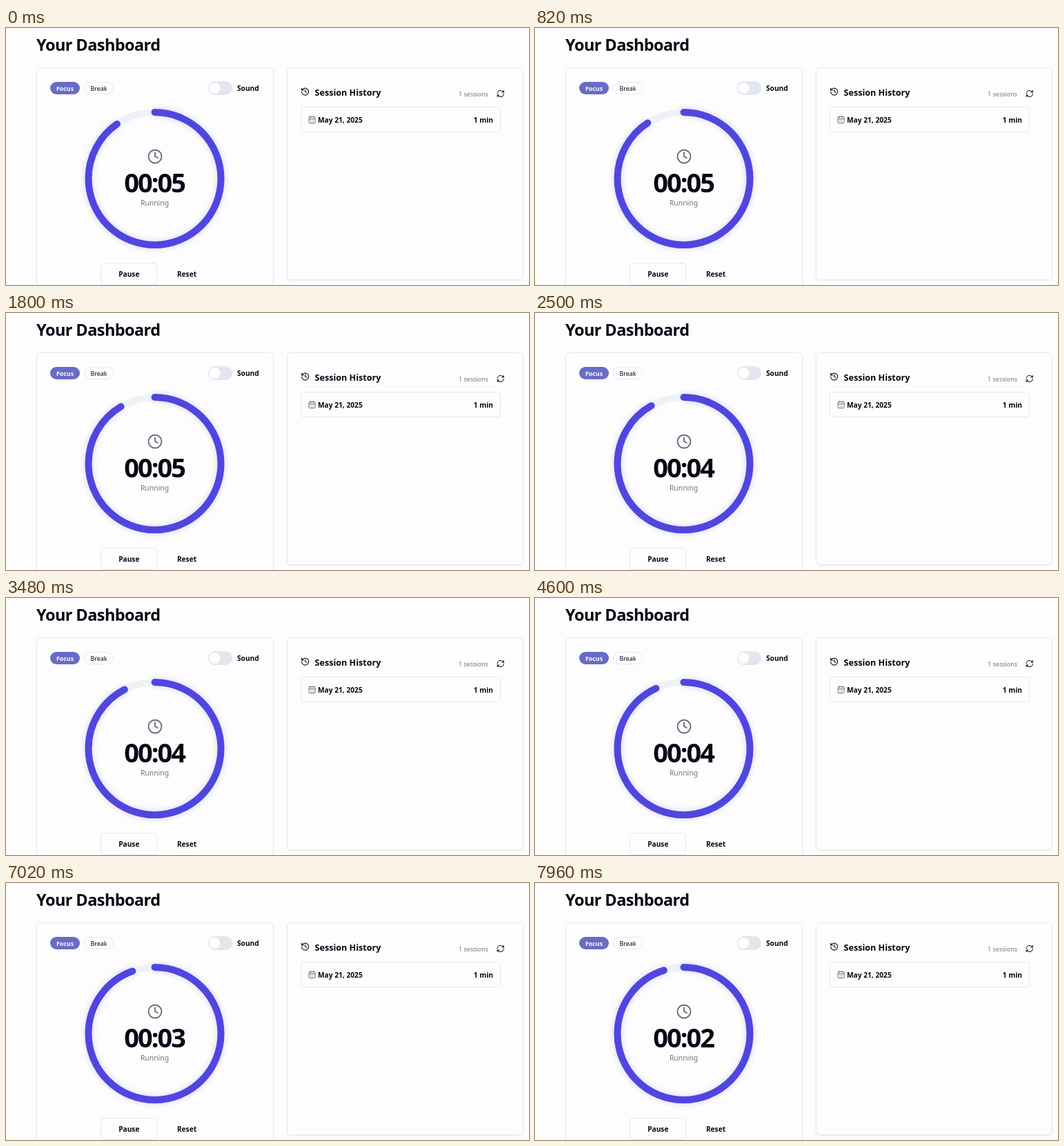
An HTML page that plays this animation: 758 px wide and 372 px high, repeating every 8 s.

```html
<!DOCTYPE html>
<html lang="en">
<head>
<meta charset="utf-8">
<title>Dashboard timer</title>
<style>
  html, body { margin: 0; width: 100%; height: 100%; overflow: hidden; background: #fdfdfd; }
  svg { display: block; width: 758px; height: 372px; }
  text { font: 600 10.2px "Noto Sans", "Open Sans", sans-serif; fill: #050814; }
  .title { font-size: 23.5px; font-weight: 700; letter-spacing: -.58px; }
  .time { font-size: 38px; font-weight: 700; letter-spacing: -2px; }
  .head { font-size: 12.6px; }
  .pill { font-size: 8.9px; }
  .mute { font-size: 10.4px; font-weight: 400; fill: #6b7585; }
  .box { fill: #fdfdfd; stroke: #e4e7f0; }
  .card { filter: drop-shadow(0 1px 1px rgba(0, 0, 0, .06)); }
  .icon { fill: none; stroke: #10131c; stroke-width: 2; stroke-linecap: round; stroke-linejoin: round; }
  .gray { stroke: #68707e; }
  .ring { fill: none; stroke-width: 10; }
</style>
</head>
<body>
<svg viewBox="0 0 758 372">
  <defs>
    <filter id="blur" x="-20%" y="-20%" width="140%" height="140%">
      <feGaussianBlur stdDeviation="5"/>
    </filter>
  </defs>

  <text class="title" x="44" y="33">Your Dashboard</text>

  <!-- timer card -->
  <rect class="box card" x="44.5" y="57.5" width="343" height="340" rx="5"/>
  <rect x="64" y="78" width="43" height="18" rx="9" fill="#686cc6"/>
  <text class="pill" x="85.5" y="91" text-anchor="middle" style="fill:#fdfdfd">Focus</text>
  <rect class="box" x="113.5" y="78.5" width="42" height="17" rx="8.5"/>
  <text class="pill" x="134.5" y="91" text-anchor="middle" style="font-weight:500">Break</text>
  <rect x="293" y="77" width="35" height="20" rx="10" fill="#e2e6ee"/>
  <circle cx="302.5" cy="87" r="8" fill="#fefefe"/>
  <text x="335" y="91">Sound</text>

  <g transform="translate(215.5 218) rotate(-90)">
    <circle class="ring arc" r="96" pathLength="360" stroke="#4f46c0" stroke-linecap="round" opacity=".24" filter="url(#blur)"/>
    <circle class="ring" r="96" stroke="#eff1f7"/>
    <circle class="ring arc" r="96" pathLength="360" stroke="#4f46e0" stroke-linecap="round"/>
  </g>

  <g class="icon gray" transform="translate(204.6 174.6) scale(.95)">
    <circle cx="12" cy="12" r="10"/>
    <path d="M12 6v6l4 2"/>
  </g>
  <text class="time" id="time" x="171.2" y="238">00:05</text>
  <text class="mute" x="215.5" y="257" text-anchor="middle">Running</text>

  <rect class="box" x="137.5" y="340.5" width="81" height="31" rx="4"/>
  <text x="178.3" y="360" text-anchor="middle">Pause</text>
  <text x="262" y="360" text-anchor="middle">Reset</text>

  <!-- history card -->
  <rect class="box card" x="407.5" y="57.5" width="342" height="307" rx="5"/>
  <g class="icon" transform="translate(426.9 85.4) scale(.56)">
    <path d="M3 12a9 9 0 1 0 9-9 9.75 9.75 0 0 0-6.74 2.74L3 8M3 3v5h5M12 7v5l4 2"/>
  </g>
  <text class="head" x="447.5" y="98">Session History</text>
  <text class="mute" x="656" y="99" style="font-size:9px">1 sessions</text>
  <g class="icon" transform="translate(710.6 88.9) scale(.51)">
    <path d="M3 12a9 9 0 0 1 9-9 9.75 9.75 0 0 1 6.74 2.74L21 8M21 3v5h-5M21 12a9 9 0 0 1-9 9 9.75 9.75 0 0 1-6.74-2.74L3 16M8 16H3v5"/>
  </g>
  <rect class="box" x="427.5" y="114.5" width="289" height="36" rx="4"/>
  <g class="icon gray" transform="translate(437.6 126.6) scale(.5)">
    <rect x="3" y="4" width="18" height="18" rx="2"/>
    <path d="M8 2v4M16 2v4M3 10h18M8 14h.01M12 14h.01M16 14h.01M8 18h.01M12 18h.01M16 18h.01"/>
  </g>
  <text x="452" y="137">May 21, 2025</text>
  <text x="706" y="137" text-anchor="end">1 min</text>
</svg>
<script>
  const LOOP = 8000, STEP = 112, OFFSET = 120;
  const START_GAP = 34.6;       // degrees left open at the start
  const SPEED = 2.16 / 1000;    // degrees closed per ms
  const DEG_PER_SECOND = 6;     // one minute is a full turn
  const arcs = document.querySelectorAll('.arc');
  const time = document.getElementById('time');

  function draw(now) {
    const t = now % LOOP;
    const held = t < OFFSET ? 0 : OFFSET + Math.floor((t - OFFSET) / STEP) * STEP;
    const gap = START_GAP - held * SPEED;
    for (const arc of arcs) arc.setAttribute('stroke-dasharray', `${360 - gap} 360`);
    time.textContent = '00:0' + Math.floor(gap / DEG_PER_SECOND);
  }

  const origin = performance.now();
  function tick() {
    draw(performance.now() - origin);
    requestAnimationFrame(tick);
  }
  tick();
</script>
</body>
</html>
```
